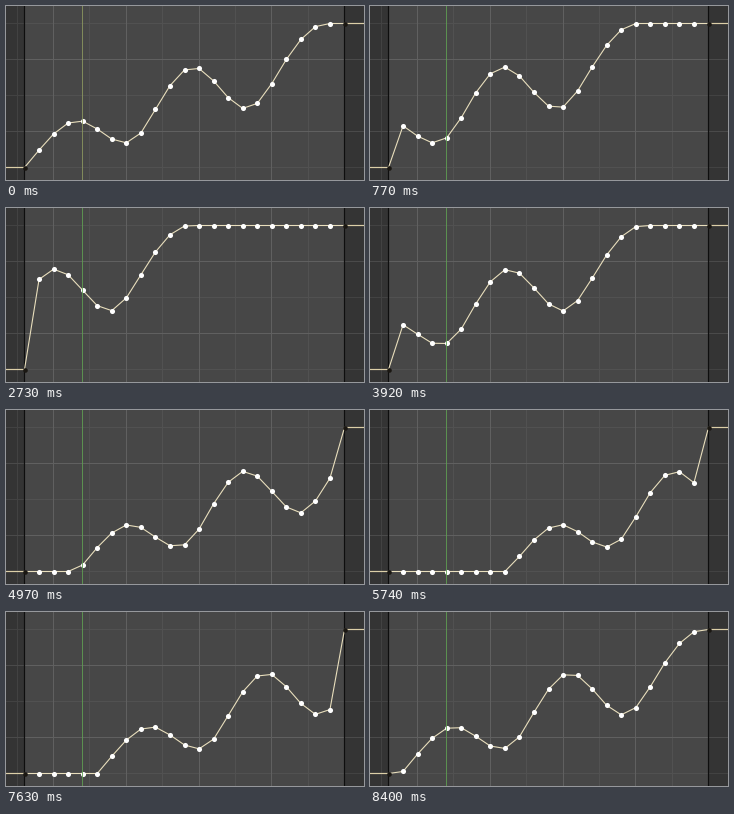
Write a matplotlib script that moves like this. It is 358 px wide and 174 px high and loops after 8.47 s.

```python
import math

import numpy as np
import matplotlib.pyplot as plt
from matplotlib.animation import FuncAnimation

plt.rcParams["path.snap"] = False

W, H, DPI = 358, 174, 100
FRAMES, STEP_MS = 121, 70
PX = 72 / DPI

LEFT, RIGHT = 18.5, 338.5
LOW, HIGH = 161.5, 17.5
CREAM, TAN = "#e9dfbd", "#dccfa8"
GREEN, OLIVE = "#5f9e52", "#8b975f"

# Turning points of the wave: x, y, slope
WAVE = np.array([(LEFT, LOW, -1.15), (72, 114.5, 0), (118, 137, 0),
                 (142, 116.5, -1.75), (187, 61, 0), (240.5, 103, 0),
                 (280.3, 53.5, -1.55), (320, HIGH, 0)])

# Drag of the wave in time: frame, offset in pixels
DRAG = np.array([(0, 0), (11, -53.5), (29, -137.3), (39, -137.3), (56, -48),
                 (71, 52.6), (87, 148.2), (98, 148.2), (110, 66), (120, 12.8)])

key_x = np.linspace(LEFT, RIGHT, 23)


def wave(x):
    """Cubic curve through the turning points, flat outside them."""
    xs, ys, slopes = WAVE.T
    x = np.clip(x, xs[0], xs[-1])
    i = np.clip(np.searchsorted(xs, x, side="right") - 1, 0, len(xs) - 2)
    h = xs[i + 1] - xs[i]
    t = (x - xs[i]) / h
    ease = t * t * (3 - 2 * t)
    bend = t * (1 - t) * h * ((1 - t) * slopes[i] - t * slopes[i + 1])
    return ys[i] + (ys[i + 1] - ys[i]) * ease + bend


def keys_at(frame):
    y = wave(key_x - np.interp(frame, *DRAG.T))
    y[0], y[-1] = LOW, HIGH
    return y


def dot_style(diameter, color):
    return dict(s=(diameter * PX) ** 2, color=color, linewidths=0, zorder=5)


fig = plt.figure(figsize=(W / 100, H / 100), dpi=DPI, facecolor="#383838")
ax = fig.add_axes([0, 0, 1, 1])
ax.set_xlim(0, W)
ax.set_ylim(H, 0)
ax.axis("off")

ax.axvspan(LEFT, RIGHT, color="#474747", lw=0, zorder=0)


def grid(draw_line, start, step, count):
    """Lines centred on whole pixels, every second one brighter."""
    for i in range(count):
        major = i % 2
        draw_line(math.floor(start + i * step) + 0.5, lw=PX, zorder=1 + major,
                  color="#606060" if major else "#515151")


grid(ax.axvline, 11.2, 400 / 11, 9)
grid(ax.axhline, 17, 36, 5)

# Shade outside the frame range, with the held values running through it
for x0, x1, edge, y in ((0, LEFT, LEFT, LOW), (RIGHT, W, RIGHT, HIGH)):
    ax.axvspan(x0, x1, color="#303030", alpha=0.45, lw=0, zorder=3)
    ax.axvline(edge, color="#0e0e0e", lw=1.2 * PX, zorder=3)
    ax.plot([x0, x1], [y, y], color=TAN, lw=1.2 * PX, zorder=4)
    ax.scatter([edge], [y], **dot_style(4.6, "#1a1712"))

curve, = ax.plot([], [], color=CREAM, lw=1.1 * PX, zorder=4)
dots = ax.scatter(key_x[1:-1], key_x[1:-1], **dot_style(5.1, "white"))
playhead = ax.axvline(76.5, color=GREEN, alpha=0.85, lw=PX, zorder=6)


def draw(frame):
    y = keys_at(frame)
    curve.set_data(key_x, y)
    dots.set_offsets(np.column_stack([key_x, y])[1:-1])
    playhead.set_color(OLIVE if frame == 0 else GREEN)
    return curve, dots, playhead


anim = FuncAnimation(fig, draw, frames=FRAMES, interval=STEP_MS,
                     repeat=True, repeat_delay=0)
plt.show()
```
